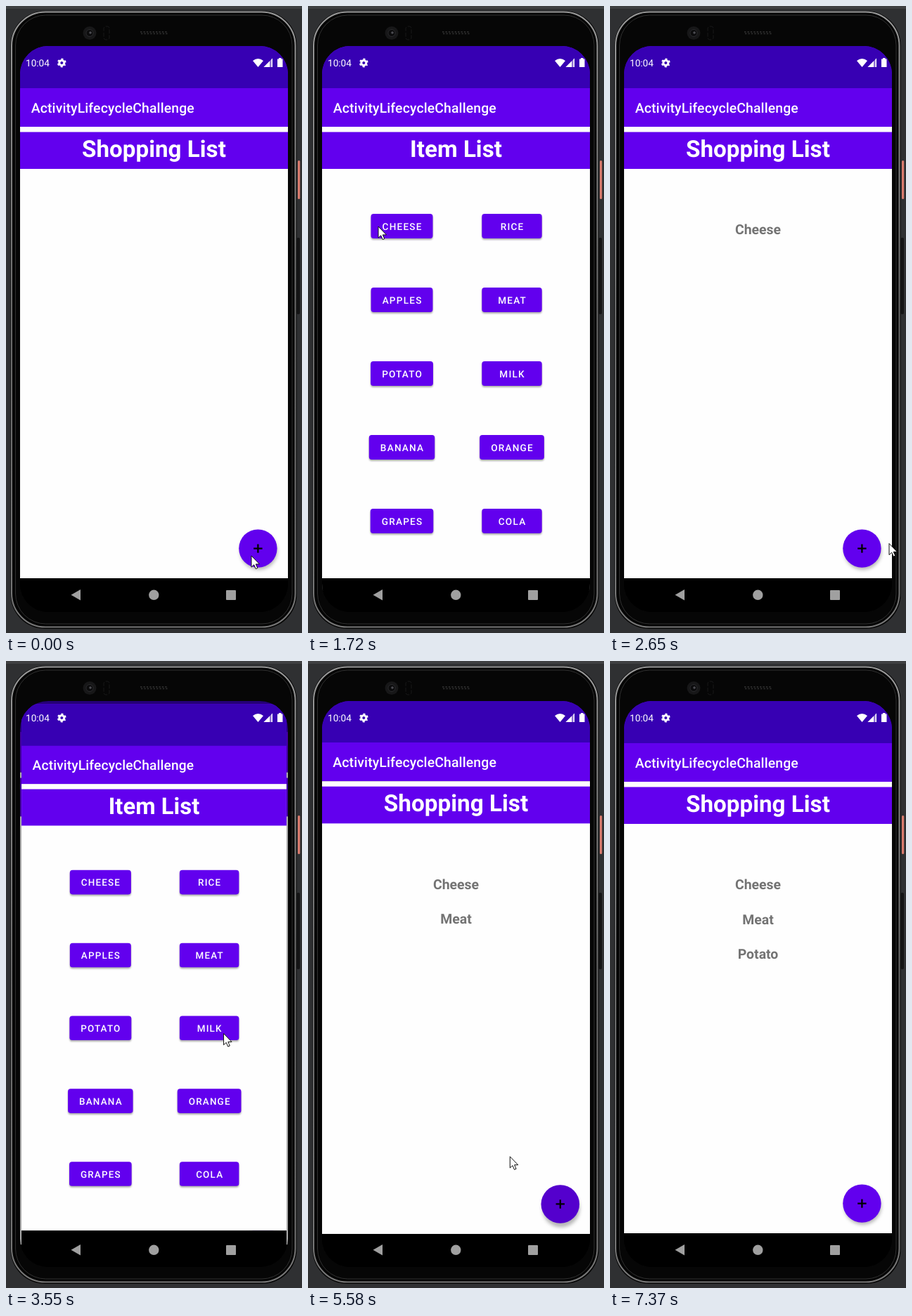
An HTML page for the animation above (8000 ms loop, 421 by 893 pixels).

```html
<!DOCTYPE html>
<html lang="en">
<head>
<meta charset="utf-8">
<title>Shopping list</title>
<style>
html, body { margin: 0; width: 100%; height: 100%; overflow: hidden; background: #2f3032; }
svg { display: block; width: 421px; height: 893px; }
text { font-family: Roboto, "Noto Sans", sans-serif; fill: #fff; text-rendering: geometricPrecision; }
.bar { font-weight: 500; font-size: 19.4px; letter-spacing: .0065em; }
.head { font-weight: 700; font-size: 33.2px; text-anchor: middle; }
.item { font-weight: 700; font-size: 19.4px; text-anchor: middle; fill: #737373; }
.label { font-weight: 500; font-size: 13.58px; letter-spacing: .0893em; text-anchor: middle; }
.clock { font-size: 13.6px; }
</style>
</head>
<body>
<svg viewBox="0 0 421 893">
  <defs>
    <clipPath id="screen"><rect x="20" y="57" width="381" height="806" rx="40"/></clipPath>
    <filter id="soft" x="-40%" y="-40%" width="180%" height="180%"><feGaussianBlur stdDeviation="2.6"/></filter>
    <filter id="thin" x="-10%" y="-20%" width="120%" height="150%"><feGaussianBlur stdDeviation="1"/></filter>
    <linearGradient id="rim" x1="0" y1="0" x2="0" y2="1">
      <stop offset="0" stop-color="#9a9a9a"/>
      <stop offset=".5" stop-color="#6a6a6a"/>
      <stop offset="1" stop-color="#777"/>
    </linearGradient>
  </defs>

  <g id="phone">
    <rect width="421" height="893" fill="#2f3032"/>
    <rect width="421" height="4" fill="#3f4042"/>
    <rect x="413.500" y="330" width="4.500" height="109" rx="2" fill="#141415"/>
    <rect x="415" y="220" width="3.200" height="55" rx="1.500" fill="#d97b6d"/>
    <rect x="6.500" y="7" width="407" height="880" rx="49" fill="#050505"/>
    <rect x="8" y="8.500" width="403.500" height="876" rx="48" fill="none" stroke="url(#rim)" stroke-width="2"/>
    <rect x="13.500" y="13" width="393.500" height="867" rx="43" fill="#060606" stroke="#303030"/>
    <circle cx="119" cy="38.500" r="9.500" fill="#171718"/>
    <circle cx="119" cy="38.500" r="5" fill="#0b0b0c" stroke="#2b2b2e"/>
    <circle cx="120" cy="38" r="1.800" fill="#4c4c52"/>
    <rect x="139" y="29" width="8" height="19" rx="3" fill="none" stroke="#181819" stroke-dasharray="6 2"/>
    <path d="M191 36.800H230M192 39.400H231" stroke="#2c2c2c" stroke-width="1.800" stroke-dasharray="2.400 2"/>
  </g>

  <g clip-path="url(#screen)">
    <rect x="20" y="57" width="381" height="806"/>
    <g id="shop"></g>
    <g id="picker"></g>
  </g>

  <g id="system" fill="#fff">
    <text class="clock" x="28" y="86">10:04</text>
    <g transform="translate(79.300 81) rotate(30)" fill="none" stroke="#fff">
      <circle r="3.500" stroke-width="3"/>
      <circle r="5.400" stroke-width="2" stroke-dasharray="2.800 2.855" stroke-dashoffset="1.400"/>
    </g>
    <path d="M358.500 87L351 78Q358.500 72 366 78Z"/>
    <path d="M379 74.500V87H366.500Z" fill-opacity=".45"/>
    <path d="M375 78.500V87H366.500Z"/>
    <path d="M379 74.500V87H377.500V76Z"/>
    <path d="M386 75.500H388V74H391.500V75.500H393.500V87H386Z"/>
    <g fill="#a0a0a0">
      <path d="M92.500 838.800L106 831V846.600Z"/>
      <circle cx="210.300" cy="838.800" r="7.200"/>
      <rect x="313" y="832" width="14" height="14" rx="1"/>
    </g>
  </g>

  <path id="cursor" d="M0 0V16.200L3.700 12.800L6.200 18.600L8.800 17.500L6.300 11.900H11.500Z"
        fill="#fff" stroke="#111" stroke-width="1" stroke-linejoin="round"/>
</svg>

<script>
const LOOP = 8000, FIRST = 500, STEP = 133.6;  // the screen refreshes in even steps
const SPEED = 1.1;                             // cursor, pixels per ms
const HIDE = 7310, EXIT = [335, 863];
const PURPLE = '#6200ee';
const $ = id => document.getElementById(id);

const rect = (x, y, w, h, fill, more = '') =>
  `<rect x="${x}" y="${y}" width="${w}" height="${h}" fill="${fill}" ${more}/>`;

// Screen with status bar, app bar, heading and navigation bar
const page = (heading, body) =>
  rect(20, 57, 381, 115, PURPLE) +
  rect(20, 57, 381, 60, '#3700b3') +
  rect(20, 172, 381, 643, '#fefefe') +
  rect(20, 179.5, 381, 52.5, PURPLE) +
  rect(20, 815, 381, 48, '#000') +
  `<text class="bar" x="35.7" y="152">ActivityLifecycleChallenge</text>` +
  `<text class="head" x="210.5" y="215">${heading}</text>` + body;

const fab =
  `<circle id="shade" cx="359.5" r="26.5" filter="url(#soft)"/>
   <circle cx="358.4" cy="772.6" r="27.2" fill="${PURPLE}"/>
   <circle id="ripple" cx="358.4" cy="772.6" r="27.2" fill-opacity=".14"/>
   <path d="M358.4 766.4v12.4m-6.2-6.2h12.4" stroke="#000" stroke-width="2.3"/>`;

const button = (name, cx, y) =>
  `<g class="button">` +
  rect(cx, y + 2, 0, 35, '#000', 'rx="4" fill-opacity=".32" filter="url(#thin)"') +
  rect(cx, y, 0, 35, PURPLE, `rx="3.9" id="${name}"`) +
  `<text class="label" x="${cx + .6}" y="${y + 22.8}">${name.toUpperCase()}</text></g>`;

const column = (names, cx) =>
  names.split(' ').map((name, i) => button(name, cx, 296 + 105 * i)).join('');

// Button width follows its label, with side padding and a minimum
function fitButtons() {
  document.querySelectorAll('.button').forEach(b => {
    const w = Math.max(85.4, b.querySelector('text').getComputedTextLength() + 31);
    b.querySelectorAll('rect').forEach(r => {
      r.setAttribute('x', r.getAttribute('x') - w / 2);
      r.setAttribute('width', w);
    });
  });
}

// A visit: add button pressed, item list opens, item picked, list closes
const visits = [
  { item: 'Cheese', press: 500, open: 862, close: 2038, wait: [349, 783], add: [349, 783], pick: [100, 314] },
  { item: 'Meat', press: 3036, open: 3266, close: 4515, wait: [397, 765.5], add: [352, 778], pick: [287.5, 402] },
  { item: 'Potato', press: 5305, open: 5545, close: 6313, wait: [352, 776], add: [352, 776], pick: [122.5, 527] }
];
const PICK_LEAD = 205, RIPPLE = 400;

// Places where the cursor rests, and when it leaves them
const stops = visits.flatMap(v => [
  { at: v.wait, leave: v.press - 100 },
  { at: v.add, leave: v.open - 55 },
  { at: v.pick, leave: v.close + 70 }
]);
stops.push({ at: EXIT, leave: LOOP });

$('shop').innerHTML = page('Shopping List', visits.map((v, i) =>
  `<text class="item" x="210.5" y="${325 + 49.5 * i}">${v.item}</text>`).join('') + fab);
$('picker').innerHTML = page('Item List',
  column('Cheese Apples Potato Banana Grapes', 133.5) + column('Rice Meat Milk Orange Cola', 290));
fitButtons();
const items = [...document.querySelectorAll('.item')];

const clamp = v => Math.max(0, Math.min(1, v));
const mix = (a, b, p) => a + (b - a) * p;
const fade = (t, delay, span) => clamp((t - delay) / span);
const show = (el, on) => { el.style.display = on ? '' : 'none'; };
const cubic = (a, b, c, d, u) => {
  const v = 1 - u;
  return a * v * v * v + 3 * b * v * v * u + 3 * c * v * u * u + d * u * u * u;
};

// Fast start, very slow end: two joined Bezier curves
function ease(x) {
  x = clamp(x);
  const [xs, ys] = x < 1 / 6
    ? [[0, .05, .1333, 1 / 6], [0, 0, .06, .4]]
    : [[1 / 6, .2083, .25, 1], [.4, .82, 1, 1]];
  let lo = 0, hi = 1;
  for (let i = 0; i < 24; i++) {
    const mid = (lo + hi) / 2;
    if (cubic(...xs, mid) < x) lo = mid; else hi = mid;
  }
  return cubic(...ys, hi);
}

function place(id, scale, alpha) {
  const g = $(id);
  g.setAttribute('transform', `translate(210.5 460) scale(${scale}) translate(-210.5 -460)`);
  g.setAttribute('opacity', alpha);
  show(g, alpha > 0);
}

function drawWindows(t) {
  const v = visits.filter(q => t >= q.open).pop();
  if (!v) {
    place('shop', 1, 1);
    place('picker', 1, 0);
  } else if (t < v.close) {
    const d = t - v.open, p = ease(d / 400);
    place('shop', mix(1, 1.05, p), mix(1, .4, fade(d, 83, 167)));
    place('picker', mix(.85, 1, p), fade(d, 50, 83));
  } else {
    const d = t - v.close, p = ease(d / 400);
    place('shop', mix(1.1, 1, p), 1);
    place('picker', mix(1, .9, p), 1 - fade(d, 33, 50));
  }
}

function drawPresses(t) {
  const down = visits.some(v => t >= v.press && t < v.open + RIPPLE);
  show($('ripple'), down);
  $('shade').setAttribute('cy', down ? 779 : 776.5);
  $('shade').setAttribute('fill-opacity', .28);
  visits.forEach((v, i) => {
    const lit = t >= v.close - PICK_LEAD && t < v.close + RIPPLE;
    $(v.item).setAttribute('fill', lit ? '#8940f2' : PURPLE);
    show(items[i], t >= v.close);
  });
}

function drawCursor(t) {
  const i = Math.max(0, stops.filter(s => t >= s.leave).length - 1);
  const [x, y] = stops[i].at, [nx, ny] = stops[i + 1].at;
  const p = clamp((t - stops[i].leave) * SPEED / (Math.hypot(nx - x, ny - y) || 1));
  $('cursor').setAttribute('transform', `translate(${mix(x, nx, p)} ${mix(y, ny, p)})`);
  show($('cursor'), t < HIDE);
}

function draw(now) {
  const t = now < FIRST ? 0 : FIRST + Math.floor((now - FIRST) / STEP) * STEP;
  drawWindows(t);
  drawPresses(t);
  drawCursor(t);
}

const begin = performance.now();
function tick() {
  draw(Math.max(0, performance.now() - begin) % LOOP);
  requestAnimationFrame(tick);
}
tick();
</script>
</body>
</html>
```
